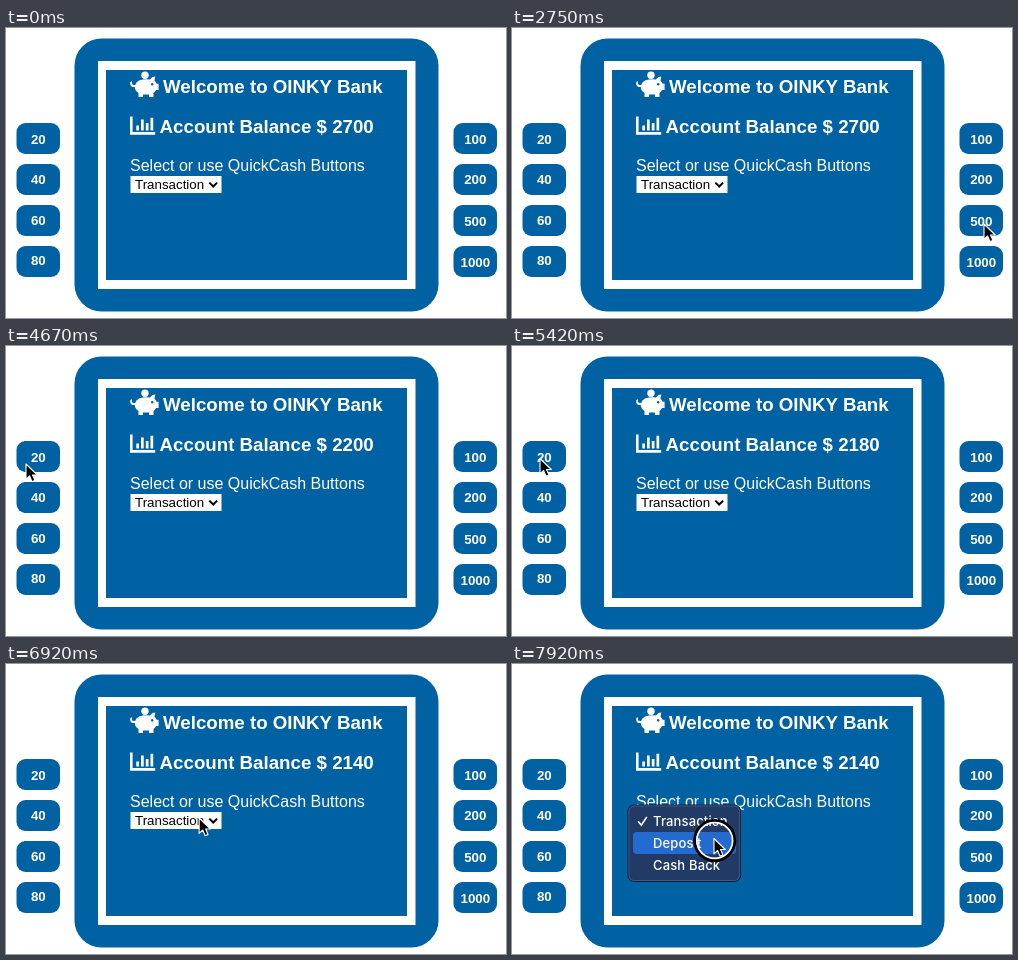
These frames come from a looping animation (500x290 px, 8000 ms). An HTML page:

```html
<!DOCTYPE html>
<html lang="en">
<head>
<meta charset="utf-8">
<title>Cash machine</title>
<style>
  html, body { margin: 0; width: 100%; height: 100%; overflow: hidden; background: #fff; }
  svg { display: block; width: 500px; height: 290px; }
  text { fill: #fff; font: 16px "Liberation Sans", Arial, sans-serif; }
  .blue { fill: #0061a3; }
  .white { fill: #fff; }
  .heading { font-size: 18.72px; font-weight: bold; }
  .key { font-size: 13.333px; font-weight: bold; text-anchor: middle; }
  .select { font-size: 13.333px; fill: #000; }
  .menu text { font: 500 13px Inter, sans-serif; letter-spacing: .15px; }
</style>
</head>
<body>
<svg viewBox="0 0 500 290">
  <rect class="blue" x="68.5" y="10.5" width="364" height="273" rx="27"/>
  <rect class="white" x="92" y="33" width="317.5" height="228"/>
  <rect class="blue" x="100" y="42" width="301" height="210"/>
  <g id="keys"></g>

  <g class="white">
    <circle cx="139" cy="47.3" r="3.7"/>
    <path d="M133 52.4Q139 50.6 144 51.6Q146 48.3 149.3 48.6L148.5 52.7Q150 54 150.7 55.8H152.6V62H150Q149 64 147.5 65V69H143V66.6H137V69H132.5V65Q128.8 62.5 128.8 59Q125 59.4 124.2 56.2Q123.8 54 125.3 53.3Q126.4 53.4 125.9 55.4Q126.3 57.5 129.2 57Q129.8 54 133 52.4Z"/>
    <circle class="blue" cx="146.2" cy="56.3" r="1.2"/>
    <path d="M124 88.5h2.6v15.5h22.6v2.7h-25.2zM130.3 97.5h2.7v5h-2.7zM135 91.5h2.7v11h-2.7zM139.8 95h2.7v7.5h-2.7zM144.5 89.7h2.7v12.8h-2.7z"/>
  </g>
  <text class="heading" x="157" y="65">Welcome to OINKY Bank</text>
  <text class="heading" id="balance" x="153.6" y="105"></text>
  <text x="124" y="143">Select or use QuickCash Buttons</text>

  <rect class="white" x="124.5" y="148" width="91" height="17"/>
  <text class="select" x="129" y="161">Transaction</text>
  <path d="M203.3 154.6l3.9 3.9 3.9-3.9" fill="none" stroke="#000" stroke-width="2"/>

  <g class="menu" id="menu">
    <rect x="116" y="141" width="112.5" height="76.5" rx="6" fill="#213b66" stroke="#101d35"/>
    <rect x="117" y="142" width="110.5" height="74.5" rx="5" fill="none" stroke="#48608a" stroke-width=".8"/>
    <rect id="highlight" x="121" width="103" height="22" rx="4" fill="#246bd1"/>
    <path d="M126.5 157.8l2.8 3.4 5.2-7.8" fill="none" stroke="#fff" stroke-width="1.6" stroke-linecap="round"/>
    <text x="141" y="162">Transaction</text>
    <text x="141" y="184">Deposit</text>
    <text x="141" y="206">Cash Back</text>
  </g>

  <g id="cursor">
    <g id="ring" fill="none">
      <circle cx=".7" cy="2" r="20" stroke="#000" stroke-width="3"/>
      <circle cx=".7" cy="2" r="17.9" stroke="#fff" stroke-width="1.7"/>
    </g>
    <path d="M0 0V15.4L3.6 12L6 17.6L8.9 16.4L6.5 11H11.3Z" fill="#000" stroke="#fff" stroke-width="1.1" stroke-linejoin="round"/>
  </g>
</svg>
<script>
  const LOOP = 8000;
  const $ = id => document.getElementById(id);
  const show = (el, on) => el.setAttribute("visibility", on ? "visible" : "hidden");

  // x, then label and text baseline per key
  const columns = [
    [10.5, [[20, 116], [40, 156], [60, 197], [80, 237]]],
    [447.5, [[100, 116], [200, 156], [500, 198], [1000, 239]]]
  ];
  $("keys").innerHTML = columns.map(([x, keys]) => keys.map(([label, y], i) =>
    `<rect class="blue" x="${x}" y="${95 + i * 41}" width="43.5" height="31" rx="9"/>
     <text class="key" x="${x + 21.8}" y="${y}">${label}</text>`).join("")).join("");

  // start, end, target x, target y
  const moves = [
    [90, 500, 472, 196],
    [3380, 4250, 20, 118],
    [4700, 4880, 28, 112.5],
    [6500, 7000, 205, 157],
    [7400, 7750, 202, 174.5]
  ];
  // start, end, amount withdrawn on release
  const presses = [
    [1920, 2080, 0],
    [2960, 3130, 500],
    [5000, 5160, 20],
    [5540, 5700, 20],
    [6090, 6260, 20],
    [7010, 7170, 0],
    [7840, 8000, 0]
  ];
  const menuOpens = 7040;
  const ease = p => p * p * (3 - 2 * p);

  function cursorAt(t) {
    let x = 225, y = 50;
    for (const [start, end, toX, toY] of moves) {
      const p = ease(Math.min(1, Math.max(0, (t - start) / (end - start))));
      x += (toX - x) * p;
      y += (toY - y) * p;
    }
    return [x, y];
  }

  function draw(now) {
    const t = now % LOOP;
    const [x, y] = cursorAt(t);
    const visible = t >= 90;
    $("cursor").setAttribute("transform", `translate(${x} ${y})`);
    show($("cursor"), visible);
    show($("ring"), visible && presses.some(([start, end]) => t >= start && t < end));

    const spent = presses.reduce((sum, [, end, amount]) => sum + (t >= end ? amount : 0), 0);
    $("balance").textContent = `Account Balance $ ${2700 - spent}`;

    show($("menu"), t >= menuOpens);
    $("highlight").setAttribute("y", y > 168 ? 168 : 146);
    requestAnimationFrame(draw);
  }
  draw(performance.now());
</script>
</body>
</html>
```
